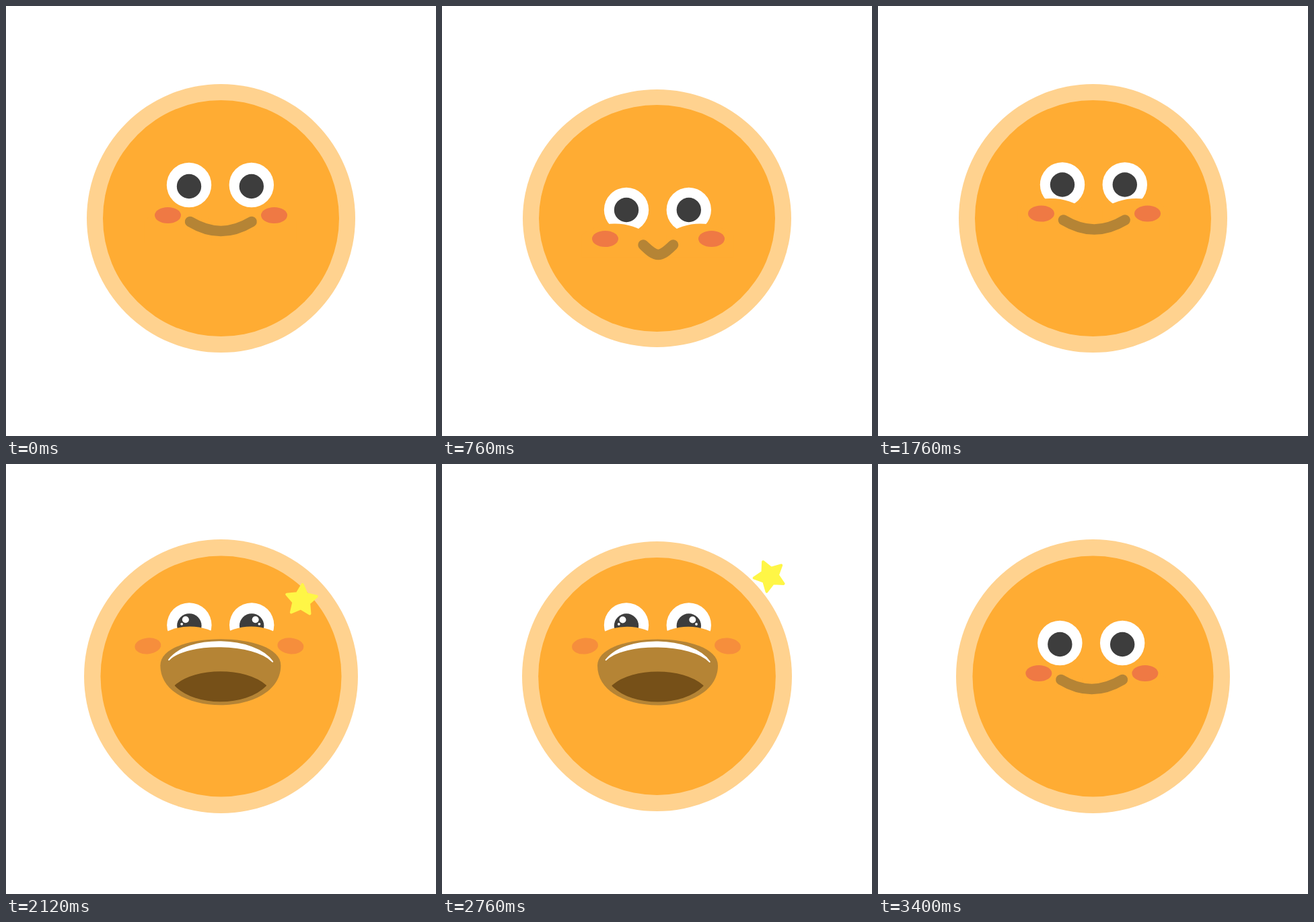
Animation of 639 by 639 pixels, one loop 3.44 s. Source, as an HTML page:

```html
<!DOCTYPE html>
<html lang="en">
<head>
<meta charset="utf-8">
<title>Happy face</title>
<style>
html, body { margin: 0; width: 100%; height: 100%; overflow: hidden; background: #fff; }
svg { display: block; width: 100%; height: 100%; }
</style>
</head>
<body>
<svg viewBox="0 0 639 639">
  <g id="body">
    <circle r="199.5" fill="#ffd28f"/>
    <circle r="175.5" fill="#ffac33"/>
  </g>
  <g id="face">
    <g id="eyes"></g>
    <g id="cheeks"></g>
    <path id="smile" fill="none" stroke="#b58435" stroke-width="15.5" stroke-linecap="round"/>
    <g id="laugh" stroke-width="2" stroke-linejoin="round">
      <path id="mouth" fill="#b58435"/>
      <path id="teeth" fill="#fff" stroke="#fff" transform="rotate(1)"/>
      <path id="tongue" fill="#765018" stroke="#765018"/>
    </g>
  </g>
  <path id="star" fill="#fff646" stroke="#fff646" stroke-width="4" stroke-linejoin="round"/>
</svg>
<script>
const LOOP = 3440, STEP = 40;
const $ = id => document.getElementById(id);
const mix = (a, b, k) => a + (b - a) * k;

// Smooth rise from 0 to 1 between times a and b.
function ramp(t, a, b) {
  const k = Math.min(1, Math.max(0, (t - a) / (b - a)));
  return k * k * (3 - 2 * k);
}

function set(el, attrs) {
  for (const name in attrs) el.setAttribute(name, attrs[name]);
  return el;
}

function add(parent, tag, attrs) {
  const el = document.createElementNS("http://www.w3.org/2000/svg", tag);
  return parent.appendChild(set(el, attrs));
}

function place(el, x, y, rest = "") {
  set(el, { transform: `translate(${x} ${y}) ${rest}` });
}

// Symmetric shape with corners at (±w, y) and edges through top and bottom.
function lens(w, y, top, bottom, bend) {
  const u = w * bend, pull = mid => (mid - y / 4) / .75;
  return `M${-w} ${y}C${-u} ${pull(top)} ${u} ${pull(top)} ${w} ${y}` +
    `C${u} ${pull(bottom)} ${-u} ${pull(bottom)} ${-w} ${y}Z`;
}

function smilePath(p) {
  const w = mix(45.8, 22.3, p), h = mix(14, 14.5, p);
  const bx = w * .66, by = mix(4.7, 7.5, p), c = w * .35;
  return `M${-w} ${-h}C${-bx} ${-by} ${-c} 0 0 0C${c} 0 ${bx} ${-by} ${w} ${-h}`;
}

function starPath() {
  const points = Array.from({ length: 10 }, (_, i) => {
    const r = i % 2 ? 12 : 23.5, a = (i * 36 - 86) * Math.PI / 180;
    return [r * Math.cos(a), r * Math.sin(a)];
  });
  return "M" + points.join("L") + "Z";
}

const sides = [-1, 1].map(s => ({
  s,
  white: add($("eyes"), "circle", { r: 33.2, fill: "#fff" }),
  pupil: add($("eyes"), "circle", { r: 18.2, fill: "#3d3d3d" }),
  shine: add($("eyes"), "circle", { r: 5, fill: "#fff" }),
  spark: add($("eyes"), "circle", { r: 1.9, fill: "#fff" }),
  lid: add($("eyes"), "path", { d: "M-50 50V16.500A84 84 0 0 1 50 16.500V50Z", fill: "#ffac33" }),
  cheek: add($("cheeks"), "ellipse", { rx: 19.5, ry: 12 })
}));
set($("mouth"), { d: lens(89.5, -3, -42, 56, 1) });
set($("teeth"), { d: lens(77, -10, -38, -31, .65) });
set($("tongue"), { d: lens(67, 27, 7, 50, .55) });
set($("star"), { d: starPath() });

function drawSide(e, lift, joy) {
  const { s } = e, x = 318.4 + 46.4 * s, y = 268;
  place(e.white, x, y - mix(2, joy, lift));
  place(e.pupil, x, y);
  place(e.shine, x + 5.5 * s, y - 9, `scale(${joy})`);
  place(e.spark, x + 11.2 * s, y - 2.5, `scale(${joy})`);
  place(e.lid, 318.5 + s * mix(63, 45.5, joy), mix(mix(302, 288.5, lift), 269.2, joy));
  place(e.cheek, mix(319.5, 316.5, joy) + s * mix(79, 106, joy), mix(311, 298, joy),
    `rotate(${6 * s * joy})`);
  set(e.cheek, { fill: `rgb(${mix(239, 246, joy)},${mix(121, 142, joy)},${mix(68, 60, joy)})` });
}

function drawMouth(pucker, joy) {
  const open = joy > .12;
  set($("smile"), { d: smilePath(pucker), display: open ? "none" : "inline" });
  set($("laugh"), { display: open ? "inline" : "none" });
  place($("smile"), 319.3, 334.5);
  place($("laugh"), 318.5, 330, `scale(${mix(.55, 1, joy)} ${mix(.15, 1, joy)})`);
}

function drawStar(t) {
  const size = ramp(t, 1880, 2080) - ramp(t, 2840, 3120);
  const f = (t - 2120) / 640;
  place($("star"), 439 + 48 * f, 202.5 - 36 * f, `rotate(${43 * f}) scale(${size})`);
  set($("star"), { display: size > 0 ? "inline" : "none" });
}

function draw(t) {
  const crouch = ramp(t, 240, 420) - ramp(t, 1140, 1300);
  const joy = ramp(t, 1860, 2040) - ramp(t, 3080, 3280);
  const lift = ramp(t, 240, 420) - ramp(t, 3080, 3260);
  const hop = ramp(t, 1140, 1300) - ramp(t, 1300, 2220);
  const swell = ramp(t, 1840, 2080) - .75 * (ramp(t, 2200, 2760) - ramp(t, 2760, 3340));
  const sway = ramp(t, 0, 400) * (1 + Math.cos((t - 760) * Math.PI / 500)) - 2 * ramp(t, 3040, 3360);

  const size = 1 + .02 * swell;
  place($("body"), 319.5, 315.5, `scale(${size} ${size * (1 - .04 * crouch)})`);
  place($("face"), sway, 35 * crouch - 5 * hop - 27.5 * joy);
  sides.forEach(e => drawSide(e, lift, joy));
  drawMouth(crouch, joy);
  drawStar(t);
}

const start = performance.now();
function tick() {
  const t = (performance.now() - start) % LOOP;
  draw(Math.floor(t / STEP) * STEP);
  requestAnimationFrame(tick);
}
tick();
</script>
</body>
</html>
```
